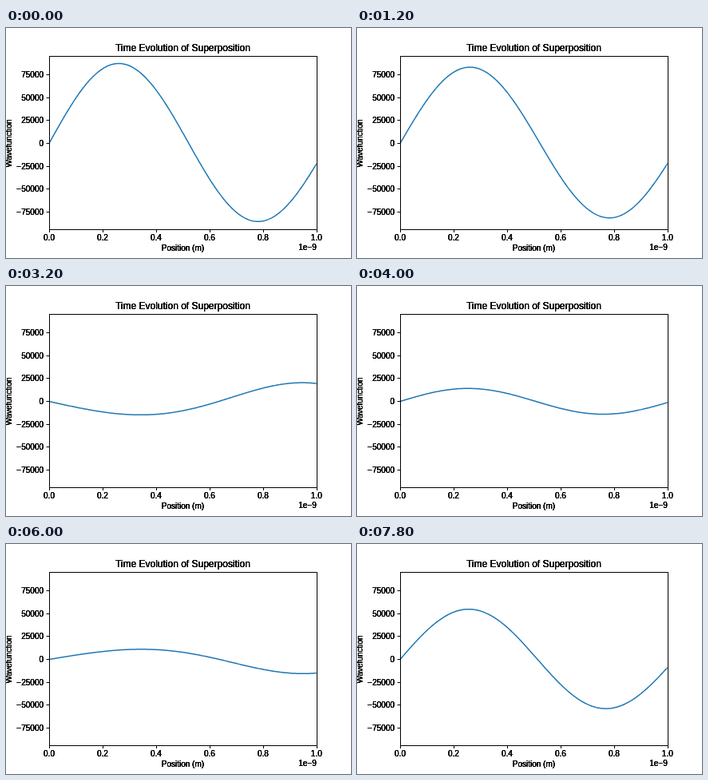
Animation of 432 by 288 pixels, one loop 8000 ms. Source, as an HTML page with a canvas:

```html
<!DOCTYPE html>
<html lang="en">
<head>
<meta charset="utf-8">
<title>Time Evolution of Superposition</title>
<style>
  html, body { margin: 0; width: 100%; height: 100%; overflow: hidden; background: #fff; }
  canvas { display: block; width: 432px; height: 288px; }
</style>
</head>
<body>
<canvas id="stage" width="432" height="288"></canvas>
<script>
const ctx = document.getElementById('stage').getContext('2d');

const LEFT = 54, RIGHT = 388.8, TOP = 34.56, BOTTOM = 252;
const ZERO = 144.5;          // y of wavefunction value 0
const UNIT = 1.1467;         // pixels per 1000
const STEP = 200, STEPS = 40;

// Two standing waves: amplitude (thousands), wave number, phase per step
const MODES = [
  { amp: 44.6, k: 6.3, w: Math.PI + 0.0655 },
  { amp: 42.9, k: 5.72, w: 2 * Math.PI / 3 + 0.0293 }
];

const px = x => LEFT + x * (RIGHT - LEFT);
const py = v => ZERO - v * UNIT;
const snap = v => Math.floor(v + 0.5) + 0.5;

function wave(x, step) {
  return MODES.reduce((sum, m) => sum + m.amp * Math.cos(m.w * step) * Math.sin(m.k * x), 0);
}

// Repeated passes give the text its heavy edges
function label(text, x, y, align = 'center', size = 10) {
  ctx.font = size + 'px "Liberation Sans", Arial, sans-serif';
  ctx.textAlign = align;
  for (let i = 0; i < 4; i++) ctx.fillText(text, x, y);
}

function line(x1, y1, x2, y2) {
  ctx.beginPath();
  ctx.moveTo(x1, y1);
  ctx.lineTo(x2, y2);
  ctx.stroke();
}

function drawCurve(step) {
  ctx.save();
  ctx.beginPath();
  ctx.rect(LEFT, TOP, RIGHT - LEFT, BOTTOM - TOP);
  ctx.clip();
  ctx.strokeStyle = '#1f77b4';
  ctx.lineWidth = 1.5;
  ctx.lineJoin = 'round';
  ctx.beginPath();
  for (let i = 0; i <= 300; i++) ctx.lineTo(px(i / 300), py(wave(i / 300, step)));
  ctx.stroke();
  ctx.restore();
}

function drawAxes() {
  ctx.strokeStyle = ctx.fillStyle = '#000';
  ctx.lineWidth = 1;
  const x0 = snap(LEFT), y0 = snap(TOP);
  ctx.strokeRect(x0, y0, snap(RIGHT) - x0, snap(BOTTOM) - y0);

  for (let i = 0; i <= 5; i++) {
    const x = px(i / 5);
    line(snap(x), 252.5, snap(x), 256);
    label((i / 5).toFixed(1), x, 266);
  }
  for (let v = -75; v <= 75; v += 25) {
    const y = py(v);
    line(50.5, Math.floor(y) + 0.5, 54, Math.floor(y) + 0.5);
    const text = (v < 0 ? '\u2212' : '') + Math.abs(v) * 1000;
    label(text, 47, Math.round(y + 3.5), 'right');
  }

  label('Time Evolution of Superposition', 221.4, 29, 'center', 12);
  label('Position (m)', 221.4, 279);
  label('1e\u22129', RIGHT, 278, 'right');
  ctx.save();
  ctx.translate(6.5, 144.5);
  ctx.rotate(-Math.PI / 2);
  label('Wavefunction', 0, 0);
  ctx.restore();
}

const start = performance.now();
function frame() {
  const t = Math.max(0, performance.now() - start);
  ctx.fillStyle = '#fff';
  ctx.fillRect(0, 0, 432, 288);
  drawCurve(Math.floor(t / STEP) % STEPS);
  drawAxes();
  requestAnimationFrame(frame);
}
frame();
</script>
</body>
</html>
```
